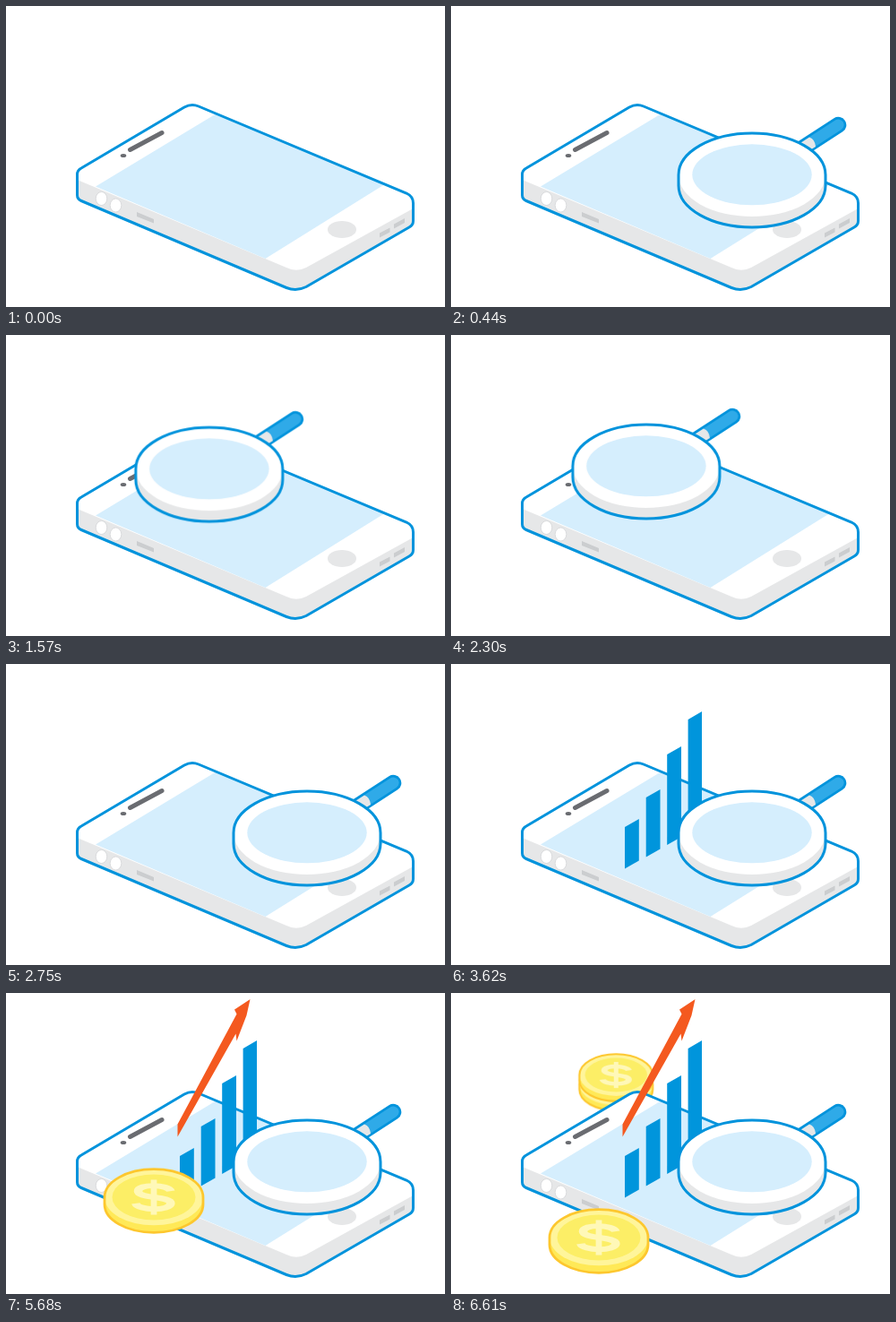
These frames come from a looping animation (490x336 px, 8 s). An HTML page:

```html
<!DOCTYPE html>
<html lang="en">
<head>
<meta charset="utf-8">
<title>Phone analytics</title>
<style>
html, body { margin: 0; width: 100%; height: 100%; overflow: hidden; background: #fff; }
svg { display: block; width: 490px; height: 336px; }
.anim { animation: 8s -0.5ms linear infinite; }

#lens { animation-name: lens; }
@keyframes lens {
  0% { opacity: 0; transform: translate(0, 20px); }
  3.25% { opacity: 0; transform: translate(0, 20px); animation-timing-function: steps(7, start); }
  5.875% { opacity: 1; transform: translate(0, 0); }
  15.125% { transform: translate(0, 0); animation-timing-function: steps(15, start); }
  20.75% { transform: translate(-126px, -44.8px); }
  28.75% { transform: translate(-126px, -44.8px); animation-timing-function: steps(16, start); }
  34.75%, 100% { opacity: 1; transform: translate(0, 0); }
}

#bars { animation-name: bars; }
@keyframes bars {
  0% { opacity: 0; transform: translate(0, 34px); }
  42.625% { opacity: 0; transform: translate(0, 34px); animation-timing-function: steps(8, start); }
  45.625%, 100% { opacity: 1; transform: translate(0, 0); }
}

#arrow { animation-name: arrow; }
@keyframes arrow {
  0% { opacity: 0; transform: translate(-40px, 70px); }
  53.5% { opacity: 0; transform: translate(-40px, 70px); animation-timing-function: steps(10, start); }
  57.25%, 100% { opacity: 1; transform: translate(0, 0); }
}

/* coins drop from --d, dip slightly, then settle */
.drop { animation-timing-function: step-end; }
#front { --d: -45px; animation-name: front; }
#low { --d: -25px; animation-name: low; }
#high { --d: -35px; animation-name: high; }
@keyframes front {
  0% { opacity: 0; transform: translateY(var(--d)); }
  71% { opacity: 1; transform: translateY(var(--d)); }
  71.375% { opacity: 1; transform: translateY(calc(var(--d) * .43)); }
  71.75% { opacity: 1; transform: translateY(4px); }
  72.125%, 100% { opacity: 1; transform: none; }
}
@keyframes low {
  0% { opacity: 0; transform: translateY(var(--d)); }
  77.5% { opacity: 1; transform: translateY(var(--d)); }
  77.875% { opacity: 1; transform: translateY(calc(var(--d) * .43)); }
  78.25% { opacity: 1; transform: translateY(5px); }
  78.625%, 100% { opacity: 1; transform: none; }
}
@keyframes high {
  0% { opacity: 0; transform: translateY(var(--d)); }
  81.5% { opacity: 1; transform: translateY(var(--d)); }
  81.875% { opacity: 1; transform: translateY(calc(var(--d) * .43)); }
  82.25% { opacity: 1; transform: translateY(5px); }
  82.625%, 100% { opacity: 1; transform: none; }
}
</style>
</head>
<body>
<svg viewBox="0 0 490 336" xmlns="http://www.w3.org/2000/svg">
  <defs>
    <path id="disc" d="M-55 0A55 31.300 0 0 1 55 0V8A55 31.300 0 0 1 -55 8Z"/>
    <g id="coin">
      <use href="#disc" fill="#ffe957"/>
      <ellipse rx="55" ry="31.300" fill="#fff59b"/>
      <ellipse rx="46.500" ry="25.500" fill="#fcee66"/>
      <g fill="none" stroke="#fff8b8" transform="scale(1.350 .850)">
        <path d="M14-8C12-17-13-18-13-8C-13 2 14-2 14 8C14 18-13 18-15 8" stroke-width="7"/>
        <path d="M0-23V23" stroke-width="5"/>
      </g>
      <use href="#disc" fill="none" stroke="#fdc72e" stroke-width="2.800"/>
    </g>
    <path id="body" d="M79.500 188Q79.500 183.500 84 181L199 113Q207 108.500 215 112L447 209Q454.500 212.500 454.500 220V240Q454.500 244.500 450 247L335 313.500Q324 319 313 314.500L84 217.500Q79.500 215.500 79.500 211Z"/>
    <path id="rim" d="M254 188.500A82 46.500 0 0 1 418 188.500V200.500A82 46.500 0 0 1 254 200.500Z"/>
  </defs>

  <g id="low" class="anim drop"><use href="#coin" transform="translate(184.200 102) scale(.745)"/></g>
  <g id="high" class="anim drop"><use href="#coin" transform="translate(184.200 91.500) scale(.745)"/></g>

  <g id="phone">
    <use href="#body" fill="#e6e7e8"/>
    <path d="M79.500 188Q79.500 183.500 84 181L199 113Q207 108.500 215 112L447 209Q454.500 212.500 454.500 220V226L335 292Q324 297.500 313 292L79.500 194Z" fill="#fff"/>
    <path d="M235 120L422 199.500L289.500 282L100 201.500Z" fill="#d5eefd"/>
    <ellipse cx="375" cy="249.500" rx="16" ry="9.500" fill="#e6e7e8"/>
    <path d="M138.500 160.500L174 141.500" stroke="#6a6c71" stroke-width="5" stroke-linecap="round"/>
    <ellipse cx="131" cy="167" rx="3.300" ry="2" fill="#6a6c71"/>
    <g fill="#fff" stroke="#d3d5d7" stroke-width=".8">
      <ellipse cx="106.500" cy="215" rx="6.300" ry="7.500"/>
      <ellipse cx="122.500" cy="222.500" rx="6.300" ry="7.500"/>
    </g>
    <path d="M146 230L165 238V242.500L146 235ZM417 253.500L428.500 247.500V252.500L417 258.500ZM433 243.500L445 237V242L433 248.500Z" fill="#cbcdcf"/>
    <use href="#body" fill="none" stroke="#0093dc" stroke-width="3"/>
  </g>

  <g id="bars" class="anim" fill="#0095dc">
    <path d="M194 182L209.800 173V219.500L194 228.500Z"/>
    <path d="M217.700 149L233.500 140V206.500L217.700 215.500Z"/>
    <path d="M241.200 101L257 92V193L241.200 202Z"/>
    <path d="M264.600 62L280 53V180L264.600 189Z"/>
  </g>

  <path id="arrow" class="anim" fill="#f4591f" d="M272.500 7L255 18.500L257.500 23.500L191.500 146.500V160.500L256.500 45.500L257.500 53.500L268.500 25Z"/>

  <g id="lens" class="anim">
    <path d="M378 168L432.300 132.800" stroke="#0093dc" stroke-width="18" stroke-linecap="round"/>
    <path d="M378 168L432.300 132.800" stroke="#2faae8" stroke-width="12.600" stroke-linecap="round"/>
    <path d="M376 162L400 146.500Q406.500 149 407 157L383 172Z" fill="#e6e7e8"/>
    <use href="#rim" fill="#e6e7e8"/>
    <ellipse cx="336" cy="188.500" rx="82" ry="46.500" fill="#fff"/>
    <ellipse cx="336" cy="188.300" rx="66.700" ry="34" fill="#d5eefd"/>
    <use href="#rim" fill="none" stroke="#0093dc" stroke-width="3"/>
  </g>

  <g id="front" class="anim drop"><use href="#coin" transform="translate(165 273)"/></g>
</svg>
</body>
</html>
```
